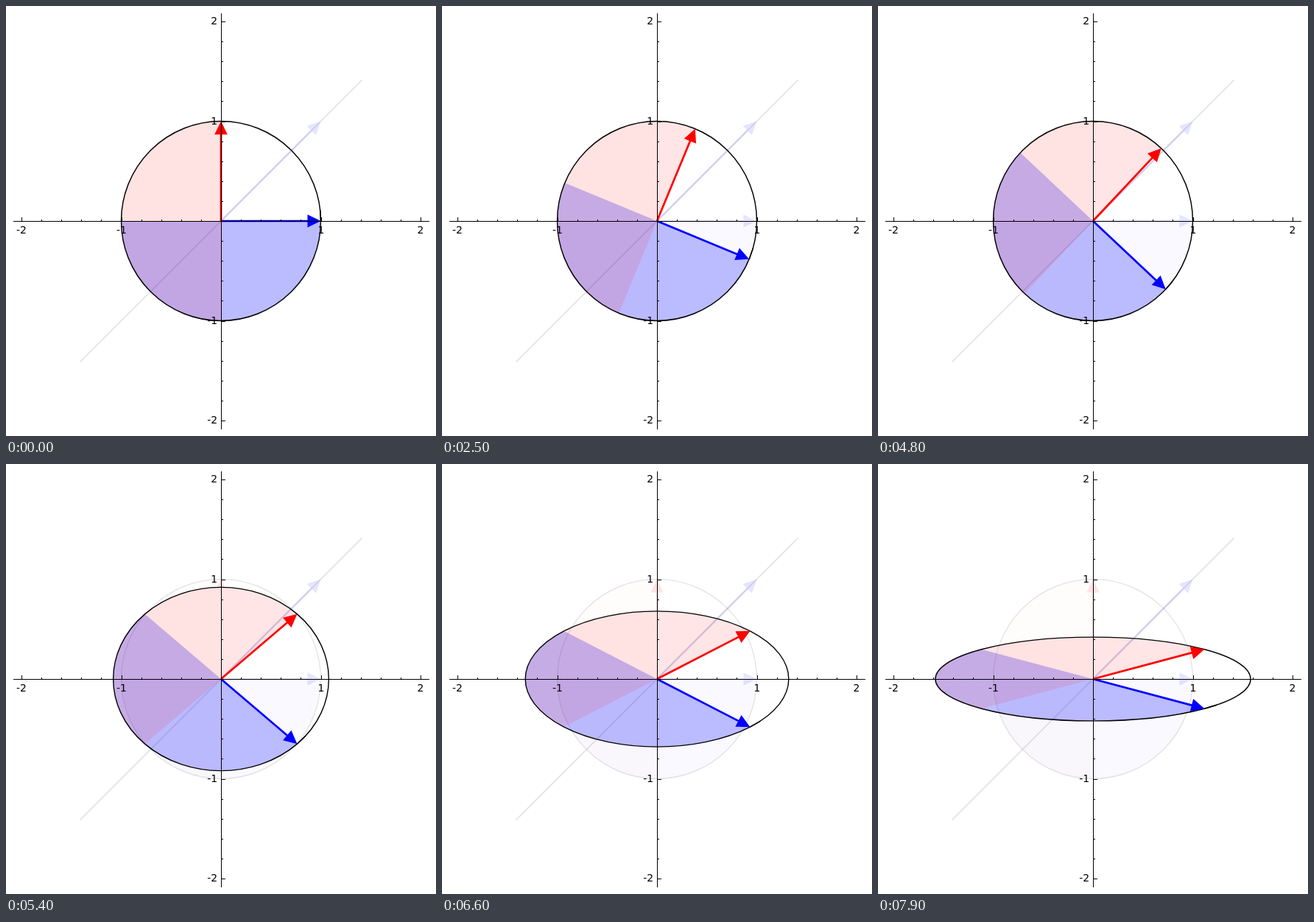
Write an HTML page with a canvas that moves like this. It is 584x584 px and loops after 8000 ms.

```html
<!DOCTYPE html>
<html lang="en">
<head>
<meta charset="utf-8">
<title>Rotate and stretch</title>
<style>
html, body { margin: 0; width: 100%; height: 100%; overflow: hidden; background: #fff; }
canvas { display: block; }
</style>
</head>
<body>
<canvas id="stage" width="584" height="584"></canvas>
<script>
const ctx = document.getElementById('stage').getContext('2d');
const SIZE = 584, MID = 292, UNIT = 135.5;
const STEP = 100, LOOP = 8000, TURN_STEPS = 50;
const BLUE = '#00f', RED = '#f00';
const FAINT = 0.1;

// Point on the unit circle after the turn and the stretch, in pixels.
function place(pose, angle) {
  return [
    MID + UNIT * pose.a * Math.cos(angle - pose.turn),
    MID - UNIT * pose.b * Math.sin(angle - pose.turn)
  ];
}

function poseAt(step) {
  const stretch = Math.max(0, step - TURN_STEPS) * 0.02;
  return {
    turn: Math.min(step, TURN_STEPS) / TURN_STEPS * Math.PI / 4,
    a: 1 + stretch,
    b: 1 - stretch
  };
}

function halfDisc(pose, start, color, alpha) {
  ctx.globalAlpha = alpha;
  ctx.fillStyle = color;
  ctx.beginPath();
  ctx.ellipse(MID, MID, UNIT * pose.a, UNIT * pose.b, 0,
    pose.turn - start, pose.turn - start - Math.PI, true);
  ctx.fill();
}

function outline(pose, alpha) {
  ctx.globalAlpha = alpha;
  ctx.strokeStyle = '#000';
  ctx.lineWidth = 1.39;
  ctx.beginPath();
  ctx.ellipse(MID, MID, UNIT * pose.a, UNIT * pose.b, 0, 0, 2 * Math.PI);
  ctx.stroke();
}

// The curve runs a little past its start, along a short chord.
function overlap(pose) {
  ctx.beginPath();
  ctx.moveTo(...place(pose, 0));
  ctx.lineTo(...place(pose, 0.117));
  ctx.stroke();
}

function arrow([x, y], color, alpha) {
  const length = Math.hypot(x - MID, y - MID);
  const head = 18, half = 8.8, shaft = 1.35;
  ctx.save();
  ctx.translate(MID, MID);
  ctx.rotate(Math.atan2(y - MID, x - MID));
  ctx.globalAlpha = alpha;
  ctx.fillStyle = color;
  ctx.beginPath();
  ctx.moveTo(0, -shaft);
  ctx.lineTo(length - head, -shaft);
  ctx.lineTo(length - head, -half);
  ctx.lineTo(length, 0);
  ctx.lineTo(length - head, half);
  ctx.lineTo(length - head, shaft);
  ctx.lineTo(0, shaft);
  ctx.fill();
  ctx.restore();
}

function shape(pose, strength) {
  halfDisc(pose, Math.PI, BLUE, 0.25 * strength);
  halfDisc(pose, Math.PI / 2, RED, 0.1 * strength);
  outline(pose, strength);
}

function imageLine() {
  const reach = UNIT * Math.SQRT2;
  ctx.globalAlpha = FAINT;
  ctx.strokeStyle = '#000';
  ctx.lineWidth = 2;
  ctx.beginPath();
  ctx.moveTo(MID - reach, MID + reach);
  ctx.lineTo(MID + reach, MID - reach);
  ctx.stroke();
  arrow([MID + UNIT, MID - UNIT], BLUE, FAINT);
}

// The faint upright arrow only shows outside the current shape.
function faintUpright(pose, start) {
  ctx.save();
  ctx.beginPath();
  ctx.rect(0, 0, SIZE, SIZE);
  ctx.ellipse(MID, MID, UNIT * pose.a, UNIT * pose.b, 0, 0, 2 * Math.PI);
  ctx.clip('evenodd');
  arrow(place(start, Math.PI / 2), RED, FAINT);
  ctx.restore();
}

function axes() {
  ctx.globalAlpha = 1;
  ctx.fillStyle = '#000';
  ctx.fillRect(10, MID, 565, 1);
  ctx.fillRect(MID, 10, 1, 565);
  ctx.font = '13.9px "DejaVu Sans", sans-serif';
  for (let i = -10; i <= 10; i++) {
    if (!i) continue;
    const major = i % 5 === 0;
    const size = major ? 6 : 3;
    const x = Math.round(MID + i * UNIT / 5);
    const y = Math.round(MID - i * UNIT / 5);
    ctx.fillRect(x, MID + 1 - size, 1, size);
    ctx.fillRect(MID, y, size, 1);
    if (!major) continue;
    ctx.textAlign = 'center';
    ctx.fillText(i / 5, x, 309);
    ctx.textAlign = 'right';
    ctx.fillText(i / 5, 287, y + 4);
  }
}

function draw(step) {
  const start = poseAt(0), pose = poseAt(step);
  ctx.globalAlpha = 1;
  ctx.fillStyle = '#fff';
  ctx.fillRect(0, 0, SIZE, SIZE);
  imageLine();
  shape(start, FAINT);
  arrow(place(start, 0), BLUE, FAINT);
  faintUpright(pose, start);
  shape(pose, 1);
  overlap(pose);
  arrow(place(pose, 0), BLUE, 1);
  arrow(place(pose, Math.PI / 2), RED, 1);
  axes();
}

const begin = performance.now();
function tick() {
  const time = Math.max(0, performance.now() - begin) % LOOP;
  draw(Math.floor(time / STEP));
  requestAnimationFrame(tick);
}
tick();
</script>
</body>
</html>
```
